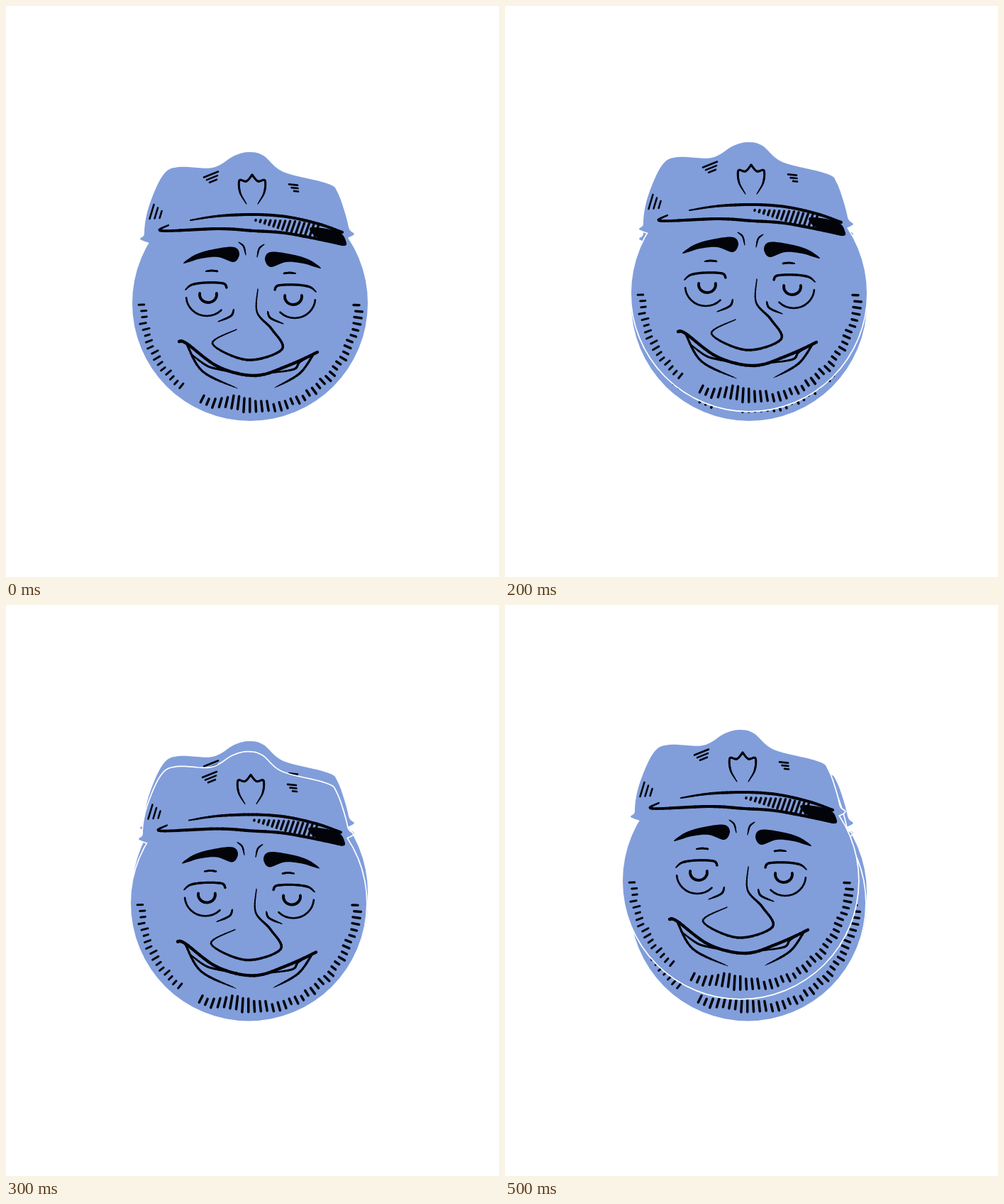
An HTML page with a canvas that plays this animation: 695 by 805 pixels, repeating every 0.6 s.

```html
<!DOCTYPE html>
<html lang="en">
<head>
<meta charset="utf-8">
<title>Nodding officer</title>
<style>
html, body { margin: 0; width: 100%; height: 100%; overflow: hidden; background: #fff; }
canvas { display: block; width: 695px; height: 805px; }
</style>
</head>
<body>
<canvas id="stage" width="695" height="805"></canvas>
<script>
const ctx = document.getElementById('stage').getContext('2d');
const BLUE = '#819edb', INK = '#02040a';
const LOOP = 600, TAU = Math.PI * 2;
const HEAD = { x: 344, y: 419, r: 166 };

// Each pose is stamped over the ones before it.
const poses = [
  { at: 0, x: 0, y: 0 },
  { at: 200, x: 0, y: -14 },
  { at: 300, x: -2, y: 1.5 },
  { at: 500, x: -12, y: -30 }
];

function random(seed) {
  return () => (seed = (seed * 16807) % 2147483647) / 2147483647;
}

// Catmull-Rom samples through "x y" pairs.
function curve(s, closed) {
  const p = s.trim().split(/\s*,\s*/).map(q => q.split(' ').map(Number));
  const n = p.length, out = [];
  const get = i => closed ? p[(i + n) % n] : p[Math.max(0, Math.min(n - 1, i))];
  for (let i = 0; i < (closed ? n : n - 1); i++) {
    const [a, b, c, d] = [get(i - 1), get(i), get(i + 1), get(i + 2)];
    for (let t = 0; t < 1; t += 0.125) {
      out.push([0, 1].map(j => b[j] + 0.5 * t * (c[j] - a[j] +
        t * (2 * a[j] - 5 * b[j] + 4 * c[j] - d[j] +
        t * (3 * (b[j] - c[j]) + d[j] - a[j])))));
    }
  }
  if (!closed) out.push(p[n - 1]);
  return out;
}

function outline(s) {
  const path = new Path2D();
  curve(s, true).forEach(([x, y]) => path.lineTo(x, y));
  path.closePath();
  return path;
}

// Brush line; a and b are the relative widths at its two ends.
function ink(s, w, a = 1, b = 1) {
  const p = curve(s), last = p.length - 1;
  for (let i = 0; i < last; i++) {
    const u = (i + 0.5) / last;
    line(...p[i], ...p[i + 1],
      w * Math.min(1, a + (1 - a) * u / 0.3, b + (1 - b) * (1 - u) / 0.3));
  }
}

function line(x1, y1, x2, y2, w) {
  ctx.lineWidth = w;
  ctx.beginPath();
  ctx.moveTo(x1, y1);
  ctx.lineTo(x2, y2);
  ctx.stroke();
}

function dash(x, y, dx, dy, w) {
  line(x - dx, y - dy, x + dx, y + dy, w);
}

function arc(x, y, rx, ry, from, to, w) {
  ctx.lineWidth = w;
  ctx.beginPath();
  ctx.ellipse(x, y, rx, ry, 0, from * TAU / 360, to * TAU / 360);
  ctx.stroke();
}

// Three parallel strokes, each shorter than the last.
function hatch(x, y, dx, dy, stepX, stepY) {
  for (let i = 0; i < 3; i++) {
    const k = 1 - i * 0.25;
    dash(x + i * stepX, y + i * stepY, dx * k, dy * k, 2.6);
  }
}

// Draws a part and its mirror image across x = axis, moved down by dy.
function pair(axis, dy, part) {
  part();
  ctx.save();
  ctx.translate(axis * 2, dy);
  ctx.scale(-1, 1);
  part();
  ctx.restore();
}

const cap = outline(`202 334, 195 321, 201 284, 221 239, 243 227, 291 228, 322 211,
  343 206, 363 211, 391 234, 452 250, 468 264, 483 312, 479 328, 344 370`);
const face = new Path2D();
face.arc(HEAD.x, HEAD.y, HEAD.r, 0, TAU);
const brow = outline('250 363, 268 350, 297 342, 322 340, 329 350, 321 361, 299 354, 275 356');
const brimEnd = outline('430 312, 468 318, 479 331, 475 338, 438 326');

function drawCap() {
  hatch(205.5, 290, -3, 10, 6.3, 2);
  hatch(289, 237.5, 10, -4, 1.5, 4.6);
  hatch(405, 252, 6, 0.6, 2, 4.6);
  pair(347, 0, () => ink('347 238, 339 247, 329 246, 330 263, 339 279', 2.9, 1, 0.4));

  ink('260 302, 300 296, 350 294, 395 297, 440 307, 474 319', 4, 0.5);
  ink('229 309, 220 317, 300 314, 350 317, 400 321, 475 336', 4.2, 0.5);
  ctx.fill(brimEnd);
  for (let i = 0; i < 14; i++) {
    const h = Math.min(7.5, i * 0.9 + 0.5);
    dash(352 + i * 6.6, 302 + i * 1.15, -h * 0.35, h, 3.4);
  }
}

function drawEye() {
  ink('253 400, 262 393, 282 390, 306 391, 311 397', 3.2, 0.5);
  arc(285, 407, 12, 11, -10, 190, 3.9);
  arc(283, 409, 29, 28, 45, 175, 2.7);
  ink('299 445, 317 437, 321 428', 2.8, 0.4, 0.7);
  ink('282 374, 290 373, 298 374', 2.7, 0.7);
}

function drawMouth() {
  ink('244 473, 255 476, 300 509, 352 521, 400 506, 439 488', 4.3);
  ink('255 477, 277 515, 326 539', 3.2, 1, 0.2);
  ink('434 490, 414 518, 379 538', 3.2, 1, 0.2);
  ink('260 490, 283 507, 304 513, 328 517', 3, 0.6, 0.6);
  ink('376 517, 406 512, 414 502, 430 493', 3, 0.6, 0.6);
}

// Radial stubble round the jaw, longest at the chin.
function drawBeard() {
  const rnd = random(41);
  for (let deg = 1; deg < 182; deg += 3.3) {
    if (deg > 118 && deg < 127) continue;
    const chin = Math.exp(-(((deg - 95) / 15) ** 2));
    const c = Math.cos(deg * TAU / 360), s = Math.sin(deg * TAU / 360);
    const r = 152 - 10 * chin + (rnd() - 0.5) * 4;
    const h = 3.2 + 5 * chin + rnd() * 2;
    dash(HEAD.x + r * c, HEAD.y + r * s, h * c, h * s, deg > 120 ? 3 : 3.5);
  }
}

function stamp({ x, y }) {
  ctx.save();
  ctx.translate(x, y);
  ctx.lineJoin = ctx.lineCap = 'round';
  ctx.strokeStyle = '#fff';
  ctx.lineWidth = 3.4;
  ctx.stroke(face);
  ctx.stroke(cap);
  ctx.fillStyle = BLUE;
  ctx.fill(face);
  ctx.fill(cap);
  ctx.fillStyle = ctx.strokeStyle = INK;
  drawCap();
  pair(347, 7, () => ctx.fill(brow));
  pair(346, 3, () => ink('328 333, 335 339, 338 351', 2.2, 0.4, 0.4));
  pair(345, 3, drawEye);
  ink(`355 399, 354 432, 375 456, 389 484, 340 499, 291 476, 325 456`, 3.4, 0.4, 0.4);
  drawMouth();
  drawBeard();
  ctx.restore();
}

let shown = 0;

function draw(now) {
  const visible = poses.filter(p => p.at <= now % LOOP);
  if (visible.length === shown) return;
  shown = visible.length;
  ctx.fillStyle = '#fff';
  ctx.fillRect(0, 0, 695, 805);
  visible.forEach(stamp);
}

const start = performance.now();
function tick() {
  draw(performance.now() - start);
  requestAnimationFrame(tick);
}
tick();
</script>
</body>
</html>
```
